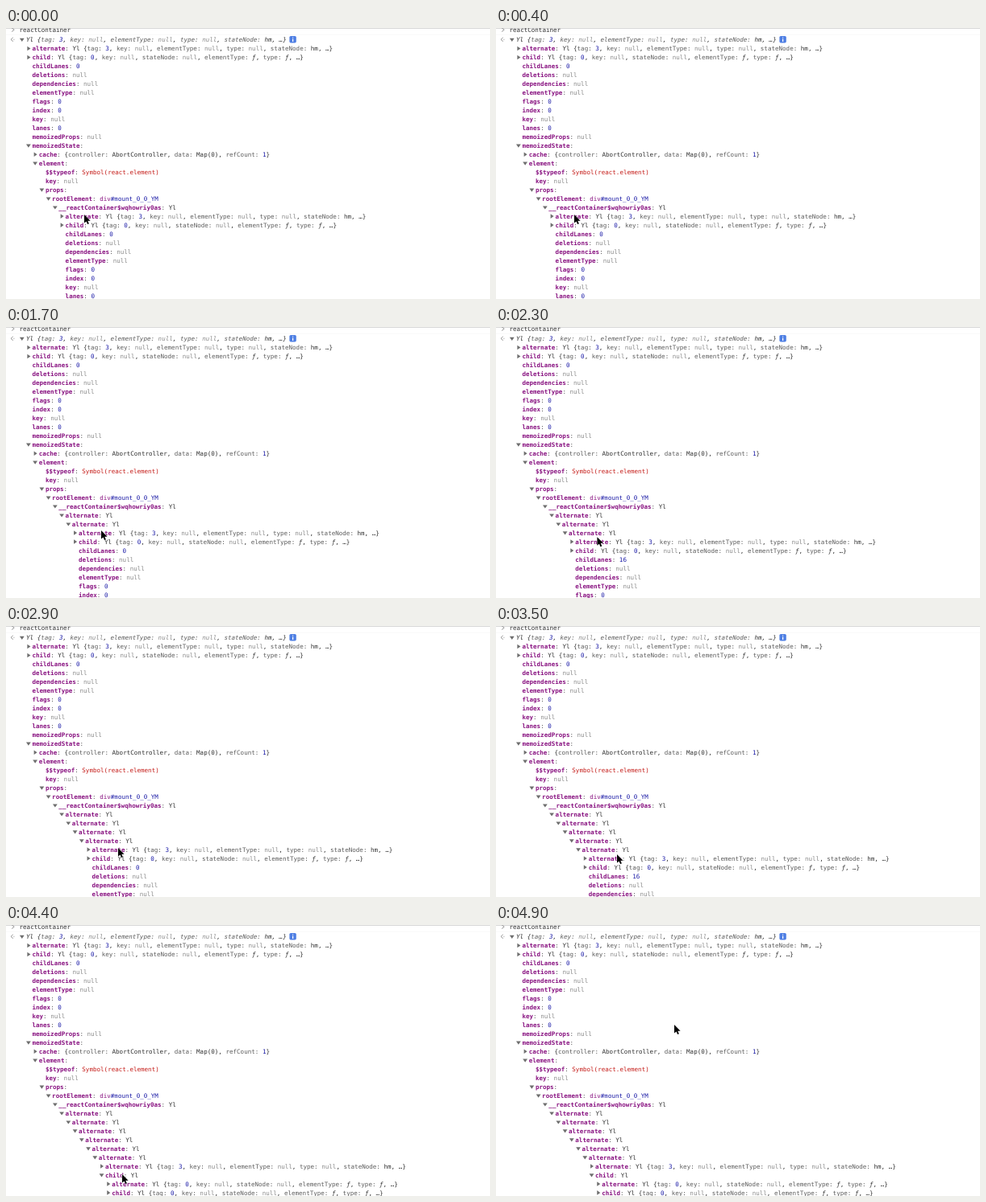
Animation, 600 px wide and 337 px high, one loop 5000 ms. Source, as an HTML page:

```html
<!DOCTYPE html>
<html lang="en">
<head>
<meta charset="utf-8">
<style>
  html, body { margin: 0; width: 100%; height: 100%; overflow: hidden; background: #fff; }
  svg { display: block; width: 600px; height: 337px; }
  text { font: 7.55px "DejaVu Sans Mono", monospace; fill: #303030; text-rendering: geometricPrecision; }
  .name { font-weight: bold; fill: #881280; }
  .field { fill: #5c5c5c; }
  .null { fill: #8a8a8a; }
  .num { fill: #1a1aa6; }
  .sym { fill: #c41a16; }
  .tag { fill: #881280; }
  .it { font-style: italic; }
  .mark { fill: #6e6e6e; }
  .line { fill: none; stroke: #8c8c8c; stroke-width: .9; }
</style>
</head>
<body>
<svg viewBox="0 0 600 337">
  <path d="M0 .5H600" stroke="#d8d8d8"/>
  <path d="M0 8.2H600" stroke="#f6f6f6" stroke-width=".7"/>
  <path class="line" d="M7.2 0L10.2 2.2 7.2 4.6"/>
  <path class="line" d="M8.8 11.8L6 14.3 8.8 16.8M9.4 14.3h1"/>
  <text x="16.5" y="4.7">reactContainer</text>
  <g id="tree"></g>
  <rect x="351.4" y="10" width="8.4" height="8.4" rx="1.6" fill="#4f7fe3"/>
  <path d="M355.6 13.4v3.6M355.6 11.4v1.1" stroke="#fff" stroke-width="1.2"/>
  <path id="cursor" d="M0 0V10.6L2.5 8.4 4.1 12.1 5.9 11.3 4.3 7.7H7.6Z" stroke="#fff" stroke-width=".8" paint-order="stroke"/>
</svg>
<script>
const CHAR = 4.545, INDENT = 8.24, ROW = 10.98, LOOP = 5000;
const ROOT = 'Yl {tag: 3, key: null, elementType: null, type: null, stateNode: hm, …}';
const FN = 'Yl {tag: 0, key: null, stateNode: null, elementType: ƒ, type: ƒ, …}';
const tree = document.getElementById('tree');
const cursor = document.getElementById('cursor');

// when each nested "alternate" opens, then when "child" opens
const opens = [500, 1100, 2100, 2700, 3300, 3900];
const childOpens = 4300;

// pointer stops: time, x, y
const stops = [
  [0, 97, 232], [500, 97, 232], [800, 107, 242], [1100, 107, 242],
  [1500, 118, 253], [2100, 118, 253], [2400, 128, 264], [2700, 128, 264],
  [2900, 139, 276], [3300, 139, 276], [3500, 150, 284], [3900, 151, 286],
  [4200, 144, 310], [4600, 144, 310], [4900, 221, 124], [5000, 221, 124]
];

const kinds = [
  [/^null$/, 'null'], [/^\d+$/, 'num'], [/^#/, 'num'], [/^div$/, 'tag'],
  [/^Symbol/, 'sym'], [/:$/, 'field'], [/^ƒ$/, 'it']
];
const tokens = /Symbol.*|Map\(0\)|#\w+|\w+:|\w+|[^\s\w]/g;

function span(x, col, str, cls) {
  return `<tspan x="${(x + col * CHAR).toFixed(2)}" class="${cls}">${str}</tspan>`;
}

function value(x, col, str) {
  return [...str.matchAll(tokens)].map(m => {
    const kind = kinds.find(k => k[0].test(m[0]));
    return span(x, col + m.index, m[0], kind ? kind[1] : '');
  }).join('');
}

function marker(x, y, open) {
  const d = open ? `M${x - 7.4} ${y - 4.5}h5.8l-2.9 4.2z` : `M${x - 6} ${y - 5.6}v5.6l4-2.8z`;
  return `<path class="mark" d="${d}"/>`;
}

function build(depth, childOpen) {
  let y = 17.3;
  let out = marker(24.3, y, true) + `<text class="it" y="${y}">${value(25, 0, ROOT)}</text>`;

  // mark: '' leaf, '+' closed, '-' open
  function row(level, name, val = '', mark = '') {
    const x = 32.4 + level * INDENT, n = name.length;
    y += ROW;
    if (y > 345) return;
    if (mark) out += marker(x, y, mark === '-');
    out += `<text y="${y.toFixed(2)}">${span(x, 0, name, 'name')}${span(x, n, ':', 'field')}${value(x, n + 2, val)}</text>`;
  }
  function fields(level, lanes) {
    row(level, 'childLanes', lanes);
    for (const s of ['deletions', 'dependencies', 'elementType']) row(level, s, 'null');
    row(level, 'flags', '0');
    row(level, 'index', '0');
    row(level, 'key', 'null');
    row(level, 'lanes', '0');
  }

  row(0, 'alternate', ROOT, '+');
  row(0, 'child', FN, '+');
  fields(0, '0');
  row(0, 'memoizedProps', 'null');
  row(0, 'memoizedState', '', '-');
  row(1, 'cache', '{controller: AbortController, data: Map(0), refCount: 1}', '+');
  row(1, 'element', '', '-');
  row(2, '$$typeof', 'Symbol(react.element)');
  row(2, 'key', 'null');
  row(2, 'props', '', '-');
  row(3, 'rootElement', 'div#mount_0_0_YM', '-');
  row(4, '__reactContainer$wqhowriy0as', 'Yl', '-');
  for (let i = 0; i < depth; i++) row(5 + i, 'alternate', 'Yl', '-');
  const level = 5 + depth;
  row(level, 'alternate', ROOT, '+');
  if (childOpen) {
    row(level, 'child', 'Yl', '-');
    row(level + 1, 'alternate', FN, '+');
    row(level + 1, 'child', FN, '+');
  } else {
    row(level, 'child', FN, '+');
  }
  fields(level, depth % 2 ? '16' : '0');
  return out;
}

function pointer(t) {
  const i = stops.findIndex(s => s[0] > t);
  const [t0, x0, y0] = stops[i - 1], [t1, x1, y1] = stops[i];
  const p = (t - t0) / (t1 - t0), e = p * p * (3 - 2 * p);
  return [x0 + (x1 - x0) * e, y0 + (y1 - y0) * e];
}

let shown = '';
const start = performance.now();
function draw(now) {
  const t = Math.floor(Math.max(0, now - start) % LOOP / 100) * 100;
  const depth = opens.filter(o => o <= t).length, childOpen = t >= childOpens;
  const state = depth + ' ' + childOpen;
  if (state !== shown) {
    tree.innerHTML = build(depth, childOpen);
    shown = state;
  }
  cursor.setAttribute('transform', `translate(${pointer(t)})`);
  requestAnimationFrame(draw);
}
draw(start);
</script>
</body>
</html>
```
